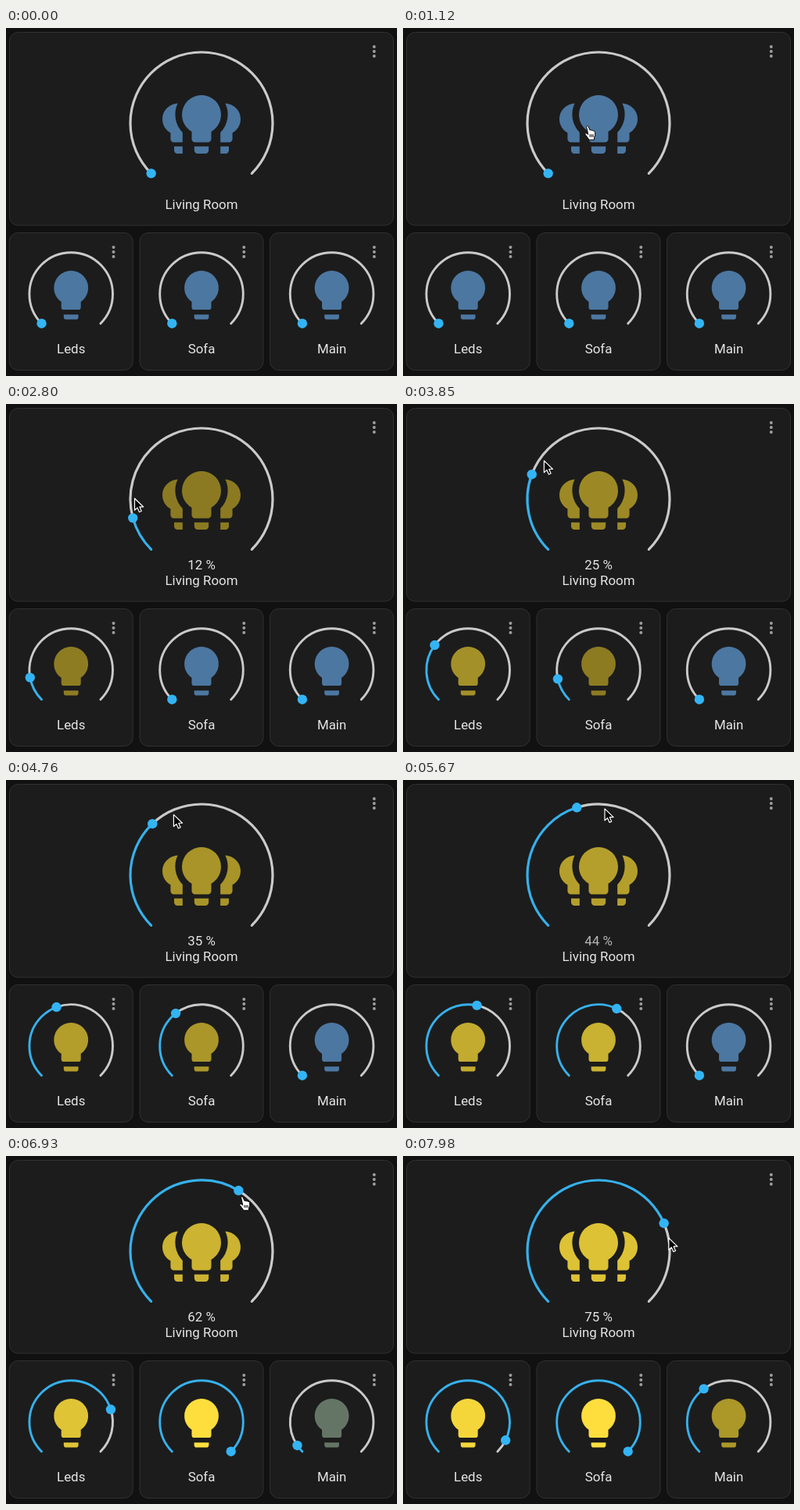
Write an HTML page that moves like this. It is 500 px wide and 446 px high and loops after 8000 ms.

```html
<!DOCTYPE html>
<html lang="en">
<head>
<meta charset="utf-8">
<title>Light cards</title>
<style>
  html, body { margin: 0; width: 100%; height: 100%; overflow: hidden; background: #111; }
  svg { display: block; }
  .card { fill: #1c1c1c; stroke: #313131; }
  .track, .fill { fill: none; stroke-linecap: round; }
  .track { stroke: #cacaca; stroke-dasharray: 1 1; }
  .fill { stroke: #36b1ec; }
  .knob { fill: #33b4f4; }
  .dots { fill: #9d9d9d; }
  text { font: 16.9px Roboto, sans-serif; fill: #e5e5e5; text-anchor: middle; }
  #arrow { fill: #000; stroke: #fff; stroke-width: 1.2; stroke-linejoin: round; }
  #hand { fill: #fff; stroke: #000; stroke-width: 1; stroke-linejoin: round; }
</style>
</head>
<body>
<svg id="stage" width="500" height="446" viewBox="0 0 500 446">
  <defs>
    <path id="single" d="M12 2A7 7 0 0 0 5 9C5 11.38 6.19 13.47 8 14.74V17A1 1 0 0 0 9 18H15A1 1 0 0 0 16 17V14.74C17.81 13.47 19 11.38 19 9A7 7 0 0 0 12 2M9 21A1 1 0 0 0 10 22H14A1 1 0 0 0 15 21V20H9Z"/>
    <path id="side" d="M4.7 5.5C2 5.7 0 7.8 0 10.3C0 12.2 1 13.8 2.5 14.6V16.5A1 1 0 0 0 3.5 17.5H6.2V14.5A8 8 0 0 1 4.7 5.5M3.6 18.75V20A1 1 0 0 0 4.6 21H6.2V18.75Z"/>
    <g id="group">
      <path d="M12 3A6 6 0 0 0 6 9C6 11.3 7.2 13.2 9 14.2V16.5A1 1 0 0 0 10 17.5H14A1 1 0 0 0 15 16.5V14.2C16.8 13.2 18 11.3 18 9A6 6 0 0 0 12 3M9.8 18.75V20A1 1 0 0 0 10.8 21H13.2A1 1 0 0 0 14.2 20V18.75Z"/>
      <use href="#side"/>
      <use href="#side" transform="matrix(-1 0 0 1 24 0)"/>
    </g>
  </defs>
  <g id="cards"></g>
  <circle id="ripple" cx="250" cy="122" r="60" fill="#44739e"/>
  <g id="bulbs"></g>
  <text id="percent" x="250" y="212.3"></text>
  <g id="cursor">
    <path id="arrow" d="M.5 .5V15.6L4 12.4L6.5 18L9.2 16.8L6.8 11.3H11.6Z"/>
    <path id="hand" d="M-1 .5C-2 -1 .2 -2 1 -.6L3.6 4.5C4.2 3.4 5.4 3.7 5.7 4.8C6.4 4 7.5 4.3 7.8 5.4C8.7 4.8 9.7 5.6 9.8 6.8L10 10.5L8.8 13.5V16.5H2.3L-2.5 10C-3.8 8.4 -2 7.3 -.8 8.4L1 9.8ZM3.3 9.5V13M5.3 9.5V13M7.3 9.5V13"/>
  </g>
</svg>
<script>
const LOOP = 8000, STEP = 70;
const PAUSE = 6930, RESUME = 7280, END = 7980;
const $ = id => document.getElementById(id);
const clamp = v => Math.min(1, Math.max(0, v));
const ramp = (t, start, length) => clamp((t - start) / length);
const rad = deg => deg * Math.PI / 180;

const small = { icon: "single", y: 341, r: 53.3, w: 2.9, label: 417.2,
                iconSize: 75, iconY: 342.3, top: 262.5, height: 176, width: 158 };

// keys: brightness as [time, percent]
const lights = [
  { ...small, name: "Living Room", icon: "group", x: 250, y: 122, r: 91, w: 3.2, label: 232,
    iconSize: 100, iconY: 123.5, top: 5.5, height: 247.5, width: 491,
    keys: [[2030, 1], [2730, 11], [3850, 25], [5670, 44], [PAUSE, 62], [END, 75]] },
  { ...small, name: "Leds", x: 83.2, keys: [[2030, 1], [3850, 31], [5670, 55], [PAUSE, 77], [END, 93]] },
  { ...small, name: "Sofa", x: 250, keys: [[3220, 1], [3850, 13], [5670, 60], [6720, 100]] },
  { ...small, name: "Main", x: 416.6, keys: [[6800, 1], [END, 37]] }
];
const room = lights[0];

// The pointer's direction from the dial's centre, in degrees
const pointerKeys = [[1960, 161.5], [2800, 181], [5670, 275], [PAUSE, 307], [END, 349]];

function track(keys, t) {
  const n = keys.findIndex(k => k[0] > t);
  if (n === 0) return keys[0][1];
  if (n < 0) return keys[keys.length - 1][1];
  const [t0, v0] = keys[n - 1], [t1, v1] = keys[n];
  return v0 + (v1 - v0) * (t - t0) / (t1 - t0);
}

function add(parent, tag, attrs) {
  const el = document.createElementNS("http://www.w3.org/2000/svg", tag);
  for (const k in attrs) el.setAttribute(k, attrs[k]);
  return parent.appendChild(el);
}

function build(c) {
  const cards = $("cards"), left = c.x - c.width / 2;
  add(cards, "rect", { class: "card", x: left, y: c.top, width: c.width, height: c.height, rx: 11 });
  for (const dy of [18.5, 24.5, 30.5])
    add(cards, "circle", { class: "dots", cx: left + c.width - 24.7, cy: c.top + dy, r: 2 });
  const e = c.r * Math.SQRT1_2;
  const arc = { d: `M${c.x - e} ${c.y + e}A${c.r} ${c.r} 0 1 1 ${c.x + e} ${c.y + e}`,
                "stroke-width": c.w, pathLength: 1 };
  c.track = add(cards, "path", { class: "track", ...arc });
  c.fill = add(cards, "path", { class: "fill", ...arc });
  c.knob = add(cards, "circle", { class: "knob", r: 6.2 });
  add(cards, "text", { x: c.x, y: c.label }).textContent = c.name;
  const s = c.iconSize / 24;
  c.bulb = add($("bulbs"), "use", { href: "#" + c.icon,
    transform: `translate(${c.x - 12 * s} ${c.iconY - 12 * s}) scale(${s})` });
}

function bulbColor(percent, lit) {
  const k = 0.49 + 0.0051 * percent, off = [76, 119, 161], on = [253, 222, 61];
  return `rgb(${off.map((v, i) => Math.round(v + (on[i] * k - v) * lit))})`;
}

// Light states freeze during the last drag, then catch up
function stateTime(t) {
  if (t < PAUSE) return t;
  return PAUSE + ramp(t, RESUME, END - RESUME) * (END - PAUSE);
}

function drawLight(c, t, state) {
  const part = (track(c.keys, c === room ? t : state) - 1) / 99;
  const angle = rad(135 + 270 * part);
  c.track.style.strokeDashoffset = -part;
  c.fill.style.strokeDasharray = `${part} 2`;
  c.fill.style.visibility = part > 0 ? "visible" : "hidden";
  c.knob.setAttribute("cx", c.x + c.r * Math.cos(angle));
  c.knob.setAttribute("cy", c.y + c.r * Math.sin(angle));
  c.bulb.setAttribute("fill", bulbColor(track(c.keys, state), ramp(t, c.keys[0][0], 280)));
}

function drawPointer(t) {
  const angle = rad(track(pointerKeys, t));
  const reach = 15 + 71 * ramp(t, 1120, 560) + 5 * ramp(t, PAUSE, END - PAUSE);
  const x = room.x + reach * Math.cos(angle), y = room.y + reach * Math.sin(angle);
  const hand = t < 1330 || (t >= 6790 && t < 7350);
  $("cursor").style.visibility = t < 1120 ? "hidden" : "visible";
  $("cursor").setAttribute("transform", `translate(${x} ${y})`);
  $("arrow").style.display = hand ? "none" : "";
  $("hand").style.display = hand ? "" : "none";
}

function draw(now) {
  const t = Math.floor(now % LOOP / STEP) * STEP;
  const state = stateTime(t);
  for (const c of lights) drawLight(c, t, state);
  drawPointer(t);

  const dip = clamp(1 - Math.abs(t - 5670) / 140);
  $("percent").textContent = Math.round(track(room.keys, state)) + " %";
  $("percent").style.opacity = ramp(t, 2030, 210) * (1 - 0.22 * dip);
  $("ripple").style.opacity = 0.12 * (ramp(t, 1120, 210) - ramp(t, 2030, 210));
}

lights.forEach(build);
function frame() {
  draw(performance.now());
  requestAnimationFrame(frame);
}
frame();
</script>
</body>
</html>
```
